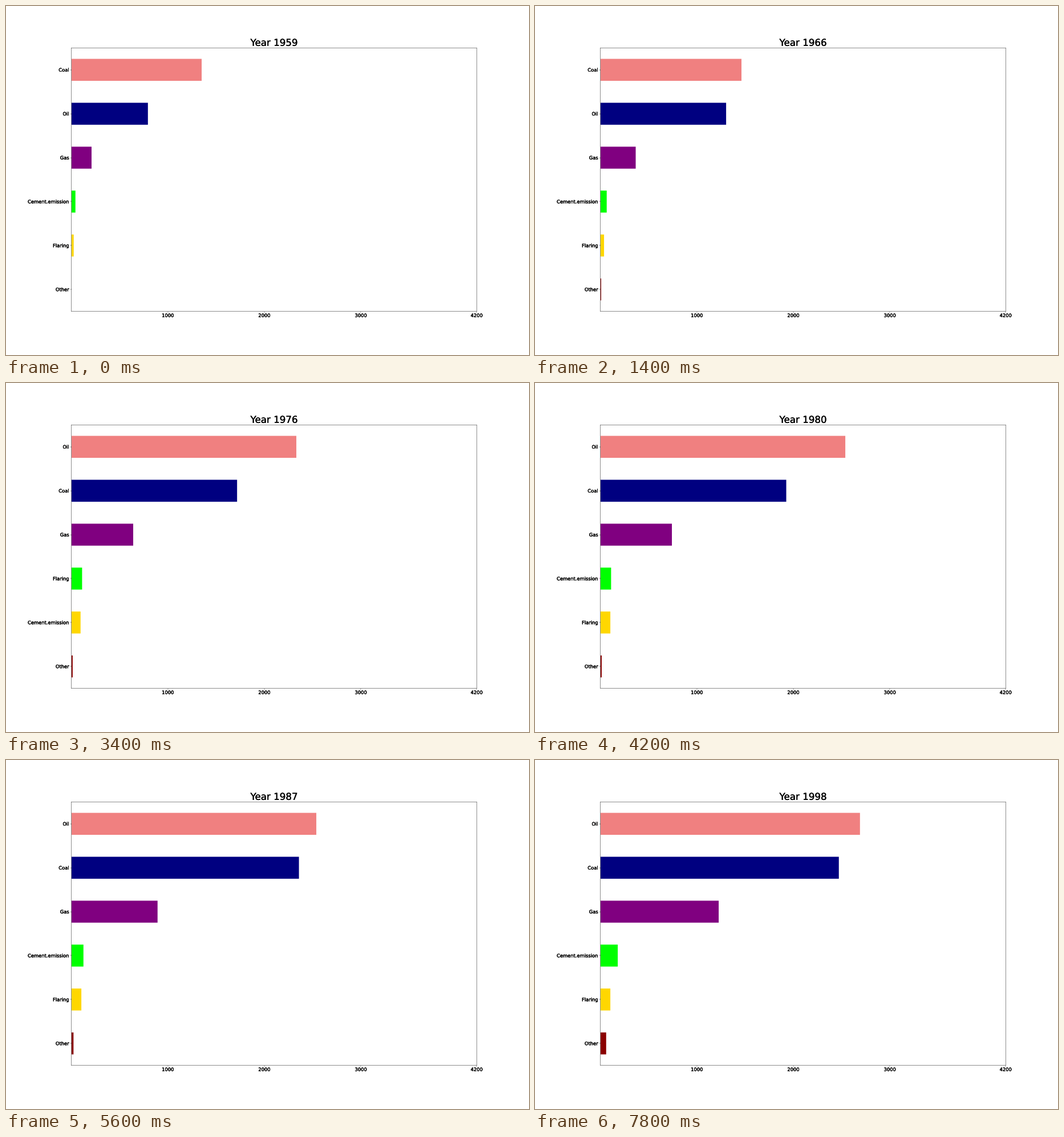
These frames come from a looping animation (917x611 px, 8000 ms). A matplotlib script:

```python
import numpy as np
import matplotlib.pyplot as plt
from matplotlib.animation import FuncAnimation
from matplotlib.patheffects import withStroke

W, H, DPI = 917, 611, 40
FIRST, LAST, STEP_MS = 1959, 1998, 200
COLORS = ["lightcoral", "navy", "purple", "lime", "gold", "darkred"]

# A few turning points per fuel (year - 1900: value), linear in between.
SERIES = {
    "Coal": {59: 1350, 66: 1462, 76: 1717, 80: 1926, 87: 2358, 89: 2443,
             97: 2471},
    "Oil": {59: 793, 66: 1303, 70: 1856, 73: 2262, 75: 2262, 79: 2538,
            90: 2538, 91: 2644, 98: 2690},
    "Gas": {59: 209, 66: 366, 70: 490, 80: 741, 87: 893, 98: 1226},
    "Cement.emission": {59: 42, 70: 79, 87: 125, 98: 180},
    "Flaring": {59: 24, 66: 38, 70: 77, 73: 111, 78: 107, 98: 65},
    "Other": {59: 0, 70: 13, 83: 14, 87: 22, 95: 60},
}

names = list(SERIES)
years = np.arange(FIRST, LAST + 1)
values = np.array([
    np.interp(years - 1900, list(points), list(points.values()))
    for points in SERIES.values()
]).T

# Bars pile up without being cleared, so each rank keeps its widest bar.
order = np.argsort(-values, axis=1, kind="stable")
widths = np.maximum.accumulate(np.take_along_axis(values, order, 1), axis=0)

# Text drawn as slightly thickened outlines keeps its sub-pixel position.
plt.rcParams["text.hinting"] = "none"
ink = [withStroke(linewidth=0.6, foreground="black")]

fig, ax = plt.subplots(figsize=(W / DPI, H / DPI), dpi=DPI)
fig.subplots_adjust(left=0.125, right=0.9, bottom=0.125, top=0.88)
rows = np.arange(len(names))
bars = ax.barh(rows, widths[0], height=0.5, color=COLORS)
ax.set_xlim(0, 4200)
ax.set_ylim(len(names) - 0.5, -0.5)
ax.set_xticks([1000, 2000, 3000, 4200])
ax.set_yticks(rows, names)
ax.tick_params(labelsize=15)
title = ax.set_title("", fontsize=30)

for shape in [*bars, *ax.spines.values()]:
    shape.set_snap(False)
for text in [title, *ax.get_xticklabels(), *ax.get_yticklabels()]:
    text.set_path_effects(ink)


def draw(i):
    for bar, width in zip(bars, widths[i]):
        bar.set_width(width)
    ax.set_yticklabels([names[k] for k in order[i]], path_effects=ink)
    title.set_text(f"Year {years[i]}")
    return [*bars, title]


anim = FuncAnimation(fig, draw, frames=len(years), init_func=lambda: draw(0),
                     interval=STEP_MS, repeat=True, repeat_delay=0, blit=False)
plt.show()
```
